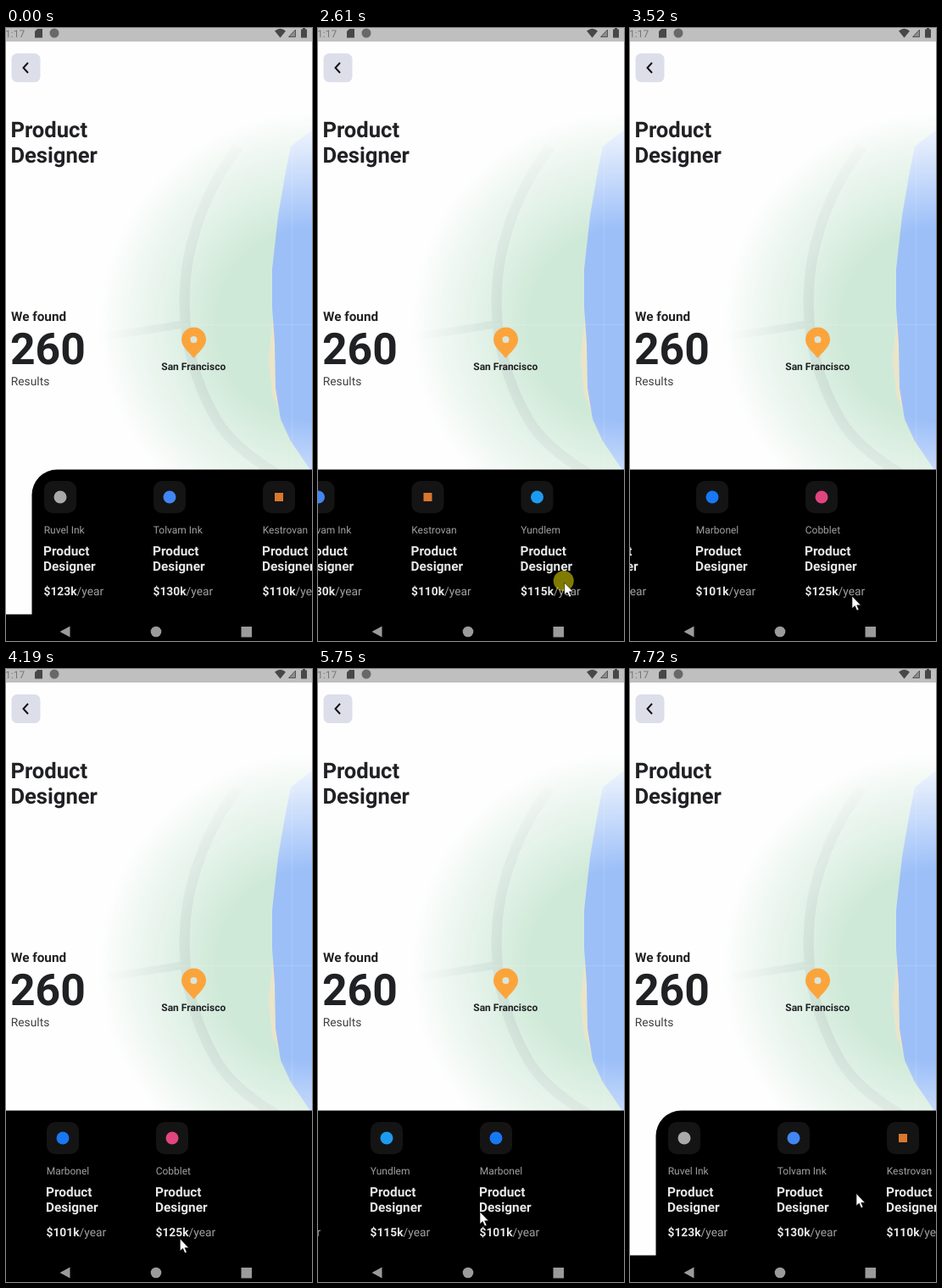
Write an HTML page that moves like this. It is 361 px wide and 724 px high and loops after 7990 ms.

```html
<!DOCTYPE html>
<html lang="en">
<head>
<meta charset="utf-8">
<title>Job search</title>
<style>
  html, body { margin: 0; width: 100%; height: 100%; overflow: hidden; background: #fefefe; }
  svg { display: block; width: 100%; height: 100%; font-family: Roboto, sans-serif; text-rendering: geometricPrecision; }
  .bold { font-weight: 700; }
  .ink { fill: #202124; }
  .pale { fill: #e6e6e6; }
  .dim { fill: #a0a0a0; }
</style>
</head>
<body>
<svg viewBox="0 0 361 724">
  <defs>
    <radialGradient id="fade" gradientUnits="userSpaceOnUse" cx="361" cy="350" r="252">
      <stop offset=".45" stop-color="#fff"/>
      <stop offset="1" stop-color="#fff" stop-opacity="0"/>
    </radialGradient>
    <mask id="soft"><rect y="90" width="361" height="440" fill="url(#fade)"/></mask>
  </defs>
  <rect width="361" height="724" fill="#fefefe"/>

  <g mask="url(#soft)">
    <rect y="90" width="361" height="440" fill="#cfe9d8"/>
    <g fill="none" stroke="#c0d8cb">
      <path stroke-width="12" d="M274 140C238 188 213 250 211 310C208 370 224 420 248 462Q268 496 322 528"/>
      <path stroke-width="9" d="M209 350L108 366"/>
    </g>
    <path fill="#ebe5c8" d="M315 340L310 392L314 432L325 460V350Z"/>
    <path fill="#9cbff8" d="M361 120L336 140L329 175L321 222L314 285V330L317 372L318 425L324 462L336 488L347 504L359 522H361Z"/>
    <path fill="none" stroke="#fff" stroke-opacity=".14" d="M337.500 120V522M200 350.500H361"/>
  </g>

  <rect width="361" height="16" fill="#bfbfbf"/>
  <text x="-1" y="10.500" font-size="12" fill="#757575">1:17</text>
  <g fill="#474747">
    <path d="M37 1H43V11.500H34V4Z"/>
    <circle cx="57" cy="6" r="5.500" fill="#686868"/>
    <path d="M317 3.500Q323.500 -2 330 3.500L323.500 11.500Z"/>
    <path d="M348 1.500H350V0H353V1.500H355V11.500H348Z"/>
  </g>
  <path d="M333.500 10.500L341.500 2V10.500Z" fill="#8c8c8c" stroke="#555"/>

  <rect x="6.500" y="30" width="34" height="34" rx="6.500" fill="#dcdfea"/>
  <path d="M26 41L20.500 47L26 53" fill="none" stroke="#111" stroke-width="2"/>

  <g class="bold ink">
    <g font-size="25.600"><text x="5.400" y="128.500">Product</text><text x="5.400" y="158.500">Designer</text></g>
    <text x="6" y="346" font-size="15.300">We found</text>
    <text x="5" y="397" font-size="51.600">260</text>
    <text x="221.300" y="404" font-size="12" text-anchor="middle">San Francisco</text>
  </g>
  <text x="5.800" y="422" font-size="13.800" fill="#404040">Results</text>
  <path fill="#fca43c" d="M221.500 390C215 382 207 376 207 368A14.500 14.500 0 0 1 236 368C236 376 228 382 221.500 390Z"/>
  <circle cx="221.500" cy="368" r="4" fill="#d9e6dc"/>

  <g id="list"><rect x="30.500" y="521.400" width="1000" height="250" rx="30"/></g>

  <rect y="692.500" width="361" height="31.500"/>
  <g fill="#9b9b9b">
    <path d="M63.500 713L75.500 706.500V719.500Z"/>
    <circle cx="177" cy="713" r="6.300"/>
    <rect x="277.500" y="707" width="12.500" height="12.500"/>
  </g>

  <g id="pointer">
    <circle id="touch" cx="-1" cy="-2" r="12" fill="#fff500" fill-opacity=".5"/>
    <path d="M0 0V14.500L3.300 11.600L5.700 17L8 16L5.700 10.800H10.300Z" fill="#fff" stroke="#000" stroke-width=".6"/>
  </g>
</svg>
<script>
const LOOP = 7990;
const GAP = 129;
const POINTER_IN = 780;
const find = id => document.getElementById(id);
const list = find('list'), pointer = find('pointer'), touch = find('touch');

const jobs = [
  { name: 'Ruvel Ink', pay: 123, color: '#a9a9a9' },
  { name: 'Tolvam Ink', pay: 130, color: '#4285f4' },
  { name: 'Kestrovan', pay: 110, color: '#d9772e', square: true },
  { name: 'Yundlem', pay: 115, color: '#1d9bf0' },
  { name: 'Marbonel', pay: 101, color: '#1877f2' },
  { name: 'Cobblet', pay: 125, color: '#e0457f' }
];
const cardX = i => 45 + i * GAP;

function cardMarkup({ name, pay, color, square }, i) {
  const mark = square
    ? `<rect x="14" y="549" width="10" height="10" fill="${color}"/>`
    : `<circle cx="19" cy="554" r="7.500" fill="${color}"/>`;
  return `<g class="card" transform="translate(${cardX(i)})">
    <rect y="535" width="38" height="38" rx="10" fill="#141414"/>${mark}
    <text class="dim" x="-.3" y="597" font-size="12">${name}</text>
    <g class="bold pale" font-size="15.400">
      <text x="-1" y="623">Product</text><text x="-1" y="641">Designer</text>
    </g>
    <text y="669.500" x="-.5" font-size="13.800"><tspan class="bold pale">$${pay}k</tspan><tspan class="dim">/year</tspan></text>
  </g>`;
}
list.insertAdjacentHTML('beforeend', jobs.map(cardMarkup).join(''));
const cards = list.querySelectorAll('.card');

// Each swipe: finger down and up, where it starts and ends, and the list's glide.
const swipes = [
  { down: 1250, up: 2050, from: [308, 688], to: [198, 674], glide: [1520, 2580], offset: 192.5 },
  { down: 2600, up: 3050, from: [291, 655], to: [110, 665], glide: [2610, 4220], offset: 513 },
  { down: 4850, up: 5470, from: [149, 651], to: [257, 640], glide: [5130, 5750], offset: 370, pause: 200 },
  { down: 5890, up: 6300, from: [150, 645], to: [320, 648], glide: [5960, 6620], offset: 148 },
  { down: 6820, up: 7250, from: [150, 645], to: [325, 640], glide: [6880, 7400], offset: 0 }
];
// Where the free pointer passes between swipes: begin, end, position.
const hovers = [
  [POINTER_IN, 980, [308, 688]],
  [2050, 2600, [291, 655]],
  [3050, 3520, [262, 671]],
  [3520, 4320, [201, 673]],
  [4460, 4590, [149, 651]],
  [5470, 5750, [191, 641]],
  [5750, 5890, [150, 645]],
  [6300, 6620, [150, 645]],
  [7250, 7720, [267, 619.5]]
];
const drags = swipes.map(s => [s.down + (s.pause ?? 0), s.up, s.to]);
const pointerMoves = [...hovers, ...drags].sort((a, b) => a[0] - b[0]);
const listMoves = swipes.map(s => [...s.glide, [s.offset]]);

const smooth = u => u * u * (3 - 2 * u);
const fling = u => smooth(1 - (1 - u) ** 2);

function follow(moves, origin, ease, t) {
  let place = origin;
  for (const [begin, end, goal] of moves) {
    if (t <= begin) break;
    const k = ease(Math.min(1, (t - begin) / (end - begin)));
    place = place.map((p, i) => p + (goal[i] - p) * k);
  }
  return place;
}

function draw(t) {
  const [offset] = follow(listMoves, [0], fling, t);
  list.setAttribute('transform', `translate(${-offset})`);
  cards.forEach((card, i) => {
    card.style.display = cardX(i) - offset < 312 ? '' : 'none';
  });
  const spot = follow(pointerMoves, [308, 676], smooth, t);
  pointer.style.display = t < POINTER_IN ? 'none' : '';
  pointer.setAttribute('transform', `translate(${spot})`);
  touch.style.display = swipes.some(s => t >= s.down && t < s.up) ? '' : 'none';
}

let start;
function tick(now) {
  start ??= now;
  draw((now - start) % LOOP);
  requestAnimationFrame(tick);
}
draw(0);
requestAnimationFrame(tick);
</script>
</body>
</html>
```
